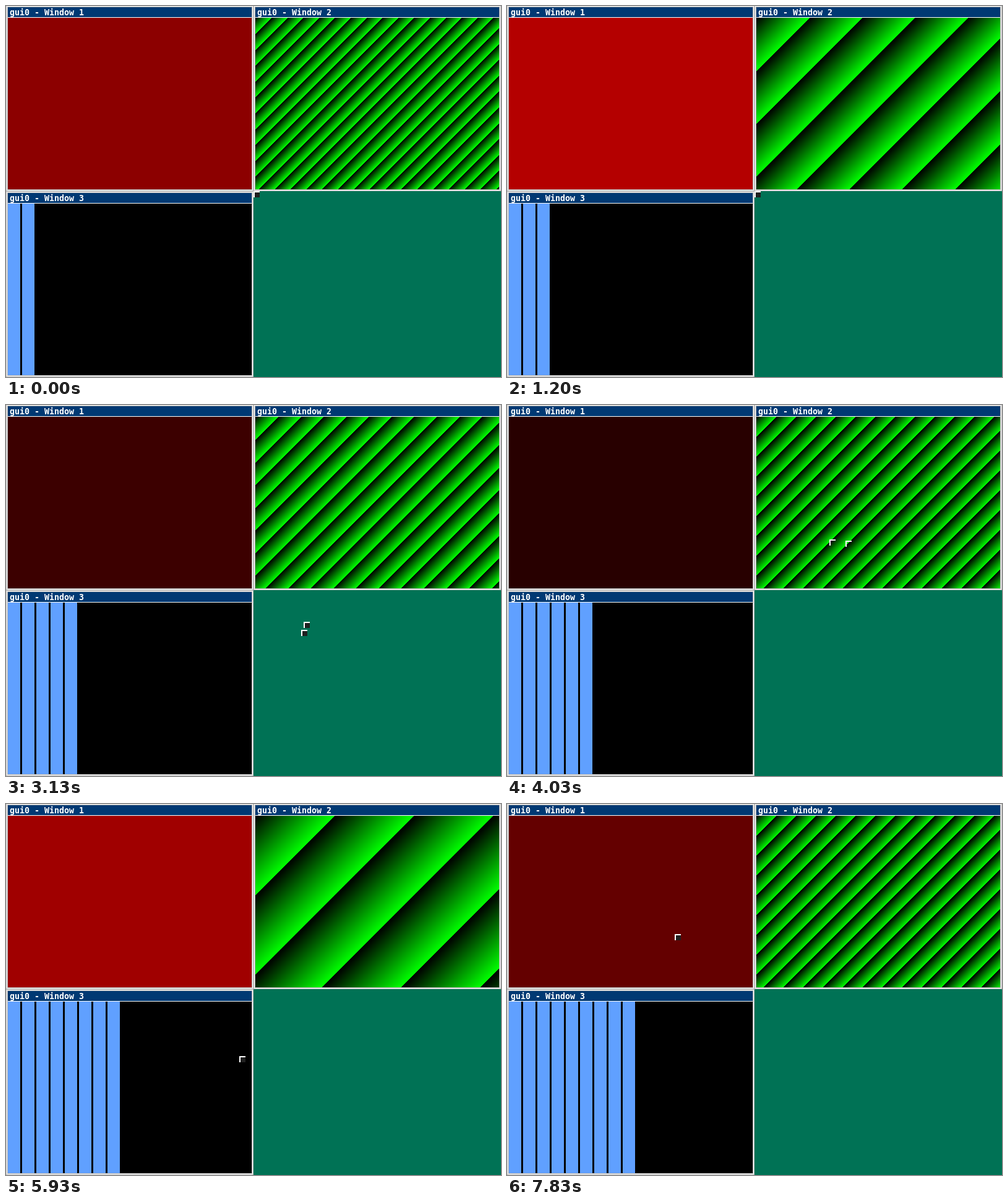
An HTML page with a canvas that plays this animation: 800 by 599 pixels, repeating every 8 s.

```html
<!DOCTYPE html>
<html lang="en">
<head>
<meta charset="utf-8">
<title>Window demo</title>
<style>
  html, body { margin: 0; width: 100%; height: 100%; overflow: hidden; background: #007255; }
  canvas { display: block; }
</style>
</head>
<body>
<canvas id="screen" width="800" height="599"></canvas>
<script>
const ctx = document.getElementById('screen').getContext('2d');
const LOOP = 8000, BODY_W = 394, BODY_H = 277;
const TRAIL = 80;

// Stops of the pointer, joined by straight moves.
const path = [
  { t: 2150, x: 400, y: 299 },
  { t: 2230, x: 401, y: 300 },
  { t: 2900, x: 470, y: 387 },
  { t: 3950, x: 521, y: 217 },
  { t: 4030, x: 547, y: 219 },
  { t: 5200, x: 211, y: 263 },
  { t: 5600, x: 330, y: 441 },
  { t: 6500, x: 457, y: 348 },
  { t: 7180, x: 457, y: 348 },
  { t: 7830, x: 271, y: 210 }
];

function pointerAt(t) {
  const next = path.findIndex(stop => stop.t >= t);
  if (next === 0) return path[0];
  if (next < 0) return path[path.length - 1];
  const a = path[next - 1], b = path[next];
  const mix = (from, to) => Math.round(from + (to - from) * (t - a.t) / (b.t - a.t));
  return { x: mix(a.x, b.x), y: mix(a.y, b.y) };
}

function rect(color, x, y, w, h) {
  ctx.fillStyle = color;
  ctx.fillRect(x, y, w, h);
}

function drawWindow(x, y, title) {
  ['#b8b8b8', '#ffffff', '#b0b0b0'].forEach((color, i) =>
    rect(color, x + i, y + i, 400 - 2 * i, 300 - 2 * i));
  rect('#003973', x + 3, y + 3, BODY_W, 16);
  rect('#ffffff', x + 3, y + 19, BODY_W, 1);
  ctx.fillStyle = '#ffffff';
  ctx.font = 'bold 13.3px "DejaVu Sans Mono", monospace';
  ctx.fillText(title, x + 6, y + 16);
}

const stripes = ctx.createImageData(BODY_W, BODY_H);
function drawStripes(x, y, scale) {
  const px = stripes.data;
  for (let row = 0, i = 0; row < BODY_H; row++) {
    for (let col = 0; col < BODY_W; col++, i += 4) {
      px[i + 1] = (row + col) * scale & 255;
      px[i + 3] = 255;
    }
  }
  ctx.putImageData(stripes, x, y);
}

function drawPointer({ x, y }) {
  const overStripes = x >= 403 && y < 296;
  if (!overStripes) rect('#202020', x, y, 10, 10);
  rect('#ffffff', x, y, 10, 2);
  rect('#ffffff', x, y, 2, 10);
}

// Triangle wave over whole steps: 0 up to top and back.
function bounce(step, top) {
  const i = step % (2 * top);
  return Math.min(i, 2 * top - i);
}

function draw(t) {
  rect('#007255', 0, 0, 800, 599);
  drawWindow(0, -1, 'gui0 - Window 1');
  drawWindow(400, -1, 'gui0 - Window 2');
  drawWindow(0, 299, 'gui0 - Window 3');

  const red = 20 + 20 * bounce(Math.floor((t + 239) / 309) + 6, 9);
  rect(`rgb(${red},0,0)`, 3, 19, BODY_W, BODY_H);

  // The stripes run at double speed briefly, then evenly.
  const stripeStep = Math.floor(Math.min(2 * t, t + 206) / 187);
  drawStripes(403, 19, bounce(stripeStep + 10, 10));

  rect('#000000', 3, 319, BODY_W, BODY_H);
  const bars = 2 + Math.floor((t + 645) / 1065);
  for (let i = 0; i < bars; i++) rect('#60a0ff', 3 + 23 * i, 319, 20, BODY_H);

  // The left windows repaint over the pointer's trail.
  const trail = pointerAt(t - TRAIL);
  if (trail.x >= 400) drawPointer(trail);
  drawPointer(pointerAt(t));
}

function tick() {
  draw(performance.now() % LOOP);
  requestAnimationFrame(tick);
}
tick();
</script>
</body>
</html>
```
